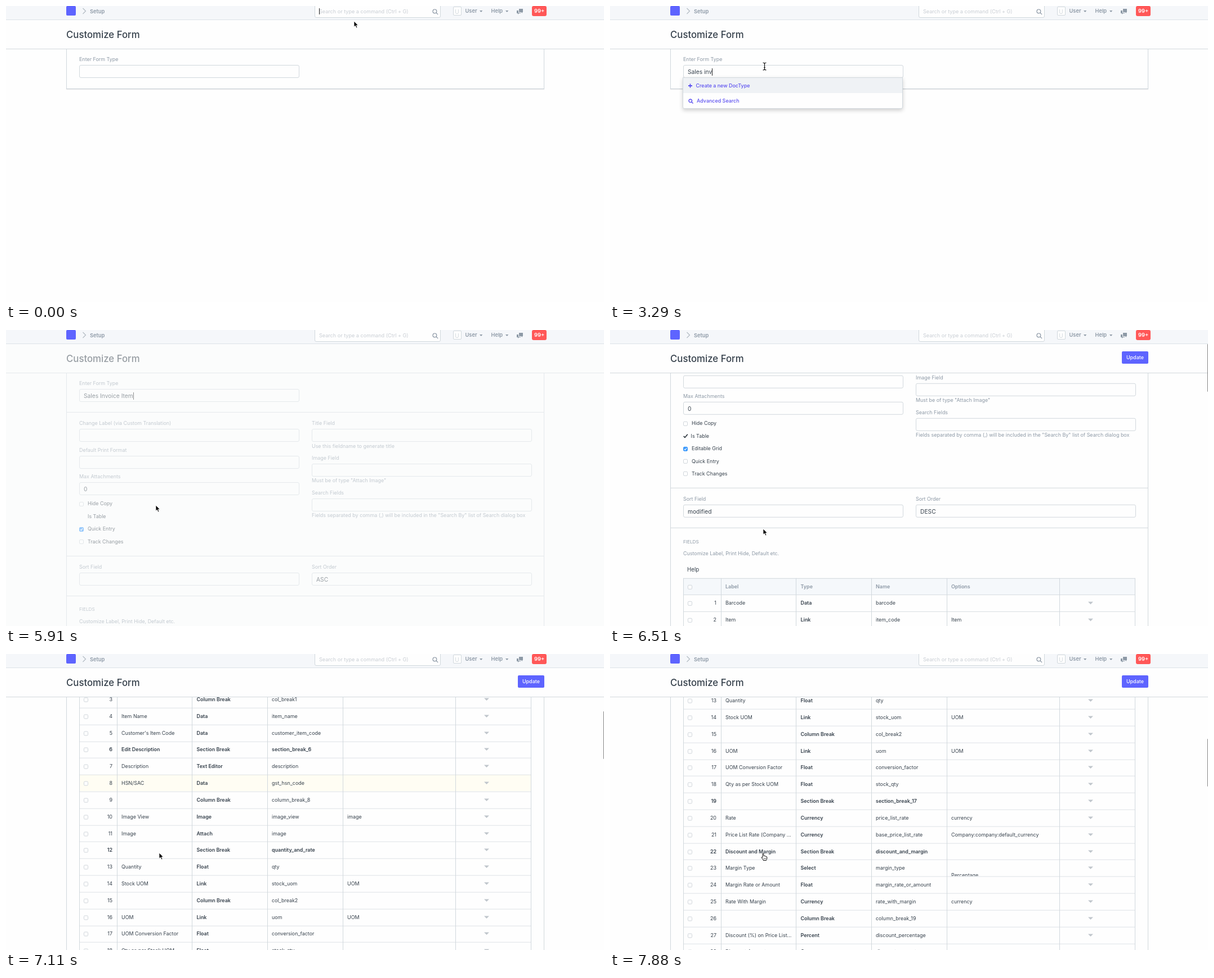
An HTML page that plays this animation: 1062x527 px, repeating every 8 s.

```html
<!DOCTYPE html>
<html lang="en">
<head>
<meta charset="utf-8">
<title>Customize Form</title>
<style>
html, body { margin: 0; width: 100%; height: 100%; overflow: hidden; background: #fefefe; }
#stage { position: relative; width: 1062px; height: 527px; overflow: hidden; background: #fefefe;
  font: 8.94px/12px Inter, "Open Sans", sans-serif; color: #36414c; }
#stage div, #stage span.t, svg { position: absolute; box-sizing: border-box; }
.t { white-space: pre; }
.muted { color: #8d99a6; }
.b { font-weight: 600; }
.nav { font-size: 9.3px; font-weight: 600; color: #8d99a6; }
.title { font-size: 16.8px; font-weight: 500; }
.caps { font-size: 8.2px; color: #8d99a6; }
.sub { font-size: 7.6px; }
.link { color: #5b50f0; font-weight: 500; }
.white { color: #fff; font-weight: 600; }
.hint { color: #c9ced4; font-size: 9.1px; }
.avatar { color: #d1d8dd; font-size: 10px; }
.big { font-size: 10.25px; }
.input { border: 1px solid #d1d8dd; border-radius: 3px; background: #fefefe; height: 23px; width: 391px; }
.line { background: #d1d8dd; }
.check { width: 8px; height: 8px; border: 1px solid #cfd5da; border-radius: 2px; background: #fff; }
.check.on { background: #3b99fc; border-color: #3b99fc; }
.menu { left: 129px; top: 127px; width: 391px; background: #fefefe; border: 1px solid #d1d8dd;
  border-radius: 0 0 3px 3px; box-shadow: 0 3px 7px rgba(0,0,0,.19); }
.menu .hot { left: 0; top: 0; width: 100%; background: #eff2f5; }
.caret { display: inline-block; width: 1px; height: 13px; margin-right: -1px; vertical-align: -3px; background: #222; }
svg { overflow: visible; }
</style>
</head>
<body>
<div id="stage"></div>
<script>
const stage = document.getElementById('stage');

function box(parent, x, y, w, h, cls = '', style = '') {
  const el = document.createElement('div');
  el.className = cls;
  el.style.cssText = `left:${x}px;top:${y}px;` + (w ? `width:${w}px;` : '') + (h ? `height:${h}px;` : '') + style;
  parent.append(el);
  return el;
}
// y is the vertical middle of the text line
function text(parent, x, y, str, cls = '') {
  const el = document.createElement('span');
  el.className = 't ' + cls;
  el.style.cssText = `left:${x}px;top:${y - 6}px`;
  el.textContent = str;
  parent.append(el);
  return el;
}
function icon(parent, x, y, inner) {
  const el = document.createElementNS('http://www.w3.org/2000/svg', 'svg');
  el.setAttribute('width', 20);
  el.setAttribute('height', 20);
  el.style.cssText = `left:${x}px;top:${y}px`;
  el.innerHTML = inner;
  parent.append(el);
  return el;
}
const layer = (parent, style = '') => box(parent, 0, 0, 1062, 0, '', style);
const show = (el, on) => { el.style.display = on ? '' : 'none'; };
const triangle = (w, h, color) => `<path d="M0 0H${w}L${w / 2} ${h}Z" fill="${color}"/>`;
const lens = (r, color, w) =>
  `<g fill="none" stroke="${color}" stroke-width="${w}"><circle cx="${r + 1}" cy="${r + 1}" r="${r}"/>` +
  `<path d="M${r * 1.7 + 1} ${r * 1.7 + 1}l${r} ${r}"/></g>`;

// Scrolling page body, clipped below the page head
const view = box(stage, 0, 77, 1062, 450, '', 'overflow:hidden');
const page = layer(view);
const panel = box(page, 107, 40, 849, 108, '',
  'border:1px solid #d1d8dd;border-bottom-color:#c3cbd2;box-shadow:0 1px 1px rgba(0,0,0,.06)');

function field(parent, x, y, label, value = '') {
  text(parent, x, y, label, 'muted');
  box(parent, x - .5, y + 10, 0, 0, 'input');
  return text(parent, x + 8, y + 22, value, 'big');
}

const typed = field(page, 130, 95, 'Enter Form Type');
const fields = layer(page);
const rule = (parent, y) => box(parent, 107, y, 849, 1, 'line');
rule(fields, 146);
field(fields, 130, 166, 'Change Label (via Custom Translation)');
field(fields, 130, 213.6, 'Default Print Format');
field(fields, 130, 261.4, 'Max Attachments', '0');
[['Title Field', 'Use this fieldname to generate title'],
 ['Image Field', 'Must be of type "Attach Image"'],
 ['Search Fields', 'Fields separated by comma (,) will be included in the "Search By" list of Search dialog box']
].forEach(([label, help], i) => {
  const y = 166 + i * 61.9;
  field(fields, 543, y, label);
  text(fields, 543, y + 40.5, help, 'muted');
});

function checks(parent, list) {
  list.forEach(([label, state], i) => {
    const y = 309.3 + i * 22.4;
    if (state === 'tick') {
      icon(parent, 130, y - 4, '<path d="M.7 4.2L3 6.6L7.8 1" fill="none" stroke="#222b33" stroke-width="1.6"/>');
      text(parent, 143.5, y, label);
    } else {
      if (state !== 'none') box(parent, 130, y - 3.5, 0, 0, 'check ' + state);
      if (state === 'on') icon(parent, 130, y - 3.5, '<path d="M2 4.2L3.5 5.8L6.2 2.2" fill="none" stroke="#fff" stroke-width="1.1"/>');
      text(parent, 145, y, label);
    }
  });
}
function sorting(parent, shift, by, order) {
  rule(parent, 402 + shift);
  field(parent, 130, 421.7 + shift, 'Sort Field', by);
  field(parent, 543, 421.7 + shift, 'Sort Order', order);
  rule(parent, 472.6 + shift);
  text(parent, 130, 497.4 + shift, 'FIELDS', 'caps');
  text(parent, 130, 518.8 + shift, 'Customize Label, Print Hide, Default etc.', 'muted');
}

const blank = layer(fields);
checks(blank, [['Hide Copy', ''], ['Is Table', 'none'], ['Quick Entry', 'on'], ['Track Changes', '']]);
sorting(blank, 0, '', 'ASC');

const loaded = layer(fields);
checks(loaded, [['Hide Copy', ''], ['Is Table', 'tick'], ['Editable Grid', 'on'], ['Quick Entry', ''], ['Track Changes', '']]);
sorting(loaded, 22.4, 'modified', 'DESC');
text(loaded, 137, 569.5, 'Help').style.fontSize = '9.8px';

// Field table: label | type | name | options
const rows = `Barcode|Data|barcode
Item|Link|item_code|Item
|Column Break|col_break1
Item Name|Data|item_name
Customer's Item Code|Data|customer_item_code
Edit Description|Section Break|section_break_6
Description|Text Editor|description
HSN/SAC|Data|gst_hsn_code
|Column Break|column_break_8
Image View|Image|image_view|image
Image|Attach|image
|Section Break|quantity_and_rate
Quantity|Float|qty
Stock UOM|Link|stock_uom|UOM
|Column Break|col_break2
UOM|Link|uom|UOM
UOM Conversion Factor|Float|conversion_factor
Qty as per Stock UOM|Float|stock_qty
|Section Break|section_break_17
Rate|Currency|price_list_rate|currency
Price List Rate (Company ...|Currency|base_price_list_rate|Company:company:default_currency
Discount and Margin|Section Break|discount_and_margin
Margin Type|Select|margin_type|Percentage
Margin Rate or Amount|Float|margin_rate_or_amount
Rate With Margin|Currency|rate_with_margin|currency
|Column Break|column_break_19
Discount (%) on Price List...|Percent|discount_percentage
Discount Amount|Currency|discount_amount`.split('\n').map(r => r.split('|'));
const PITCH = 29.82, TOP = 614.4, COLS = [205, 338.5, 472, 606];

const table = layer(loaded);
box(table, 130, 585, 803, 30, '', 'background:#f5f8fb;border-top:1px solid #d1d8dd');
['Label', 'Type', 'Name', 'Options'].forEach((h, i) => text(table, COLS[i], 599.5, h, 'muted b'));
box(table, 138, 596.5, 0, 0, 'check');
rows.forEach(([label, type, name, options = ''], i) => {
  const row = box(table, 0, TOP + i * PITCH, 1062, PITCH, '', 'overflow:hidden');
  const weight = type === 'Section Break' ? 'b' : '';
  const mid = PITCH / 2;
  box(row, 130, 0, 803, PITCH, '', 'border-top:1px solid #d1d8dd;' + (name === 'gst_hsn_code' ? 'background:#fffdf3' : ''));
  box(row, 138, mid - 3, 0, 0, 'check');
  const number = text(row, 0, mid, i + 1, weight);
  number.style.cssText += ';width:189px;text-align:right';
  text(row, COLS[0], mid, label, weight);
  text(row, COLS[1], mid, type, 'b');
  text(row, COLS[2], mid, name, weight);
  text(row, COLS[3], type === 'Select' ? mid + 12.5 : mid, options);
  icon(row, 849, mid - 2, triangle(9, 4.6, '#c0c6cc'));
});
[130, 197, 330, 463.5, 598, 798, 932].forEach(x => box(table, x, 585, 1, 1100, 'line'));

// Suggestion menus
const finder = box(page, 0, 0, 0, 56, 'menu');
finder.style.cssText = 'height:56px';
box(finder, 0, 0, 0, 27, 'hot');
icon(finder, 9, 10, '<path d="M3.5 .5v7M0 4h7" stroke="#5b50f0" stroke-width="1.8"/>');
text(finder, 22.5, 13.5, 'Create a new DocType', 'link');
icon(finder, 8.5, 36.5, lens(2.8, '#5b50f0', 1.4));
text(finder, 24, 40.5, 'Advanced Search', 'link');

const results = box(page, 0, 0, 0, 150, 'menu');
results.style.cssText = 'height:150px';
box(results, 0, 0, 0, 36, 'hot');
['Item', '', 'Payment', 'Timesheet'].forEach((kind, i) => {
  const y = 13.7 + i * 35.7;
  text(results, 9, y, ('Sales Invoice ' + kind).trim(), 'b');
  text(results, 9, y + 9.8, 'Accounts', 'sub');
});

// Page head
const head = box(stage, 0, 25, 1062, 52, '', 'background:#fefefe;border-bottom:1px solid #d1d8dd');
text(head, 107, 25.5, 'Customize Form', 'title');
const update = box(head, 909, 12.5, 47, 22, '', 'background:#5e64ff;border-radius:2px');
text(update, 8, 11, 'Update', 'white').style.fontWeight = 500;
const freeze = box(stage, 0, 25, 1062, 502, '', 'background:#fafcfb');

// Navigation bar
const nav = box(stage, 0, 0, 1062, 25, '', 'background:#f5f7fa;border-bottom:1px solid #dce2e7');
box(nav, 107, 0, 17, 17, '', 'background:#5e64ff;border-radius:2px');
icon(nav, 136, 4, '<path d="M.5 0L5.5 5L.5 10" fill="none" stroke="#b3bbc3" stroke-width="1.2"/>');
text(nav, 149, 9.5, 'Setup', 'nav');
box(nav, 547.5, -4, 224, 25, '', 'background:#fefefe;border:1px solid #d1d8dd;border-radius:3px');
text(nav, 556, 9.5, 'Search or type a command (Ctrl + G)', 'hint');
const searchCaret = box(nav, 556, 4, 1, 11, '', 'background:#222');
icon(nav, 756.5, 4.5, lens(3.4, '#8d99a6', 1.2));
box(nav, 793.5, 1, 15, 16, '', 'background:#fefefe;border:1px solid #d1d8dd;border-radius:2px');
text(nav, 797.3, 9.5, 'U', 'avatar');
text(nav, 815.5, 9, 'User', 'nav');
icon(nav, 841, 8, triangle(5.4, 3, '#8d99a6'));
text(nav, 861.5, 9, 'Help', 'nav');
icon(nav, 886.5, 8, triangle(5.4, 3, '#8d99a6'));
icon(nav, 907, 5, '<path d="M4 0H11V6H10V8L8 6H4Z" fill="#8d99a6"/><path d="M0 3H3V7H7V8H4L2 10V8H0Z" fill="#8d99a6"/>');
box(nav, 934, 0, 26, 18, '', 'background:#ff5858;border-radius:3px');
text(nav, 938, 9.2, '99+', 'white').style.fontSize = '9.3px';

const thumb = box(stage, 1060.5, 0, 2, 85, '', 'background:#858585;border-radius:1px');

// Pointers, drawn with the hot spot at 0,0
const pointers = {
  arrow: '<path d="M0 0V10.2L2.4 8L4.1 12L5.9 11.2L4.2 7.4H7.3Z" fill="#000" stroke="#fff" stroke-width=".8"/>',
  beam: '<path d="M-3 -6.5Q0 -6.5 0 -4.5Q0 -6.5 3 -6.5M0 -5V5M-3 6.5Q0 6.5 0 4.5Q0 6.5 3 6.5M-1.3 2H1.3" fill="none" stroke="#111" stroke-width="1.2"/>',
  hand: '<path d="M-1 1Q0 -.8 1 1V4.5Q2.3 3.6 3 5Q4.3 4.3 5 5.6Q6.7 5.2 6.8 7V9Q6.6 10.5 5.6 11.5V12.5H.2V11.5L-3 7.6Q-3.2 6 -1 7.2Z" fill="#fff" stroke="#111" stroke-width="1"/><path d="M1.3 8V10.5M3 8V10.5M4.7 8V10.5" stroke="#111" stroke-width=".6"/>'
};
for (const kind in pointers) pointers[kind] = icon(stage, 0, 0, pointers[kind]);

// Tracks of [time, value...]; each value holds until the next
const moves = [
  [0, 'arrow', 618, 27], [150, 'arrow', 600, 32], [300, 'arrow', 540, 48], [450, 'arrow', 430, 74],
  [600, 'arrow', 330, 95], [750, 'beam', 282, 107], [910, 'beam', 274.5, 107.5],
  [3740, 'beam', 272, 112], [3890, 'hand', 264, 130], [4040, 'hand', 256, 140], [4180, 'hand', 252.5, 142],
  [4330, 'arrow', 252, 142], [5400, 'arrow', 254, 180], [5550, 'arrow', 258, 240], [5700, 'arrow', 263, 290],
  [5910, 'arrow', 266, 312], [6060, 'arrow', 268, 330], [6210, 'arrow', 270, 345], [6360, 'arrow', 272, 354],
  [7730, 'hand', 272, 355]
];
const typing = [
  [0, ''], [1660, 's'], [1810, 'sa'], [1950, 'sal'], [2100, 'sale'], [2240, 'sales'], [2390, 'Sales '],
  [2840, 'Sales i'], [2990, 'Sales in'], [3290, 'Sales inv'], [4330, 'Sales Invoice Item']
];
const carets = [[0, 0], [910, 1], [1360, 0], [1660, 1], [3740, 0], [4330, 1], [6210, 0]];
const veil = [[0, 0], [4630, .2], [4780, .5], [6210, .25], [6360, 0]];
const scrolls = [
  [0, 0], [6510, 143.2], [6660, 290], [6810, 425], [6960, 530], [7110, 608.5],
  [7260, 680], [7440, 745], [7580, 808], [7730, 865], [7880, 904.5]
];
const at = (track, t) => track.findLast(step => step[0] <= t).slice(1);

function draw(t) {
  const [kind, x, y] = at(moves, t);
  for (const name in pointers) show(pointers[name], name === kind);
  pointers[kind].style.transform = `translate(${x}px,${y}px)`;

  show(searchCaret, t < 910);
  typed.textContent = at(typing, t)[0];
  if (at(carets, t)[0]) typed.insertAdjacentHTML('beforeend', '<i class="caret"></i>');
  show(finder, t >= 1660 && t < 3740);
  show(results, t >= 3740 && t < 4330);

  const ready = t >= 6210;
  show(fields, t >= 4630);
  panel.style.height = t >= 4630 ? '2600px' : '108px';
  show(blank, !ready);
  show(loaded, ready);
  show(update, ready);
  freeze.style.opacity = at(veil, t)[0];

  const [scroll] = at(scrolls, t);
  page.style.transform = `translateY(${-77 - scroll}px)`;
  thumb.style.top = 1.3 + scroll * .1655 + 'px';
  show(thumb, scroll > 0);
}

function tick() {
  draw(performance.now() % 8000);
  requestAnimationFrame(tick);
}
tick();
</script>
</body>
</html>
```
